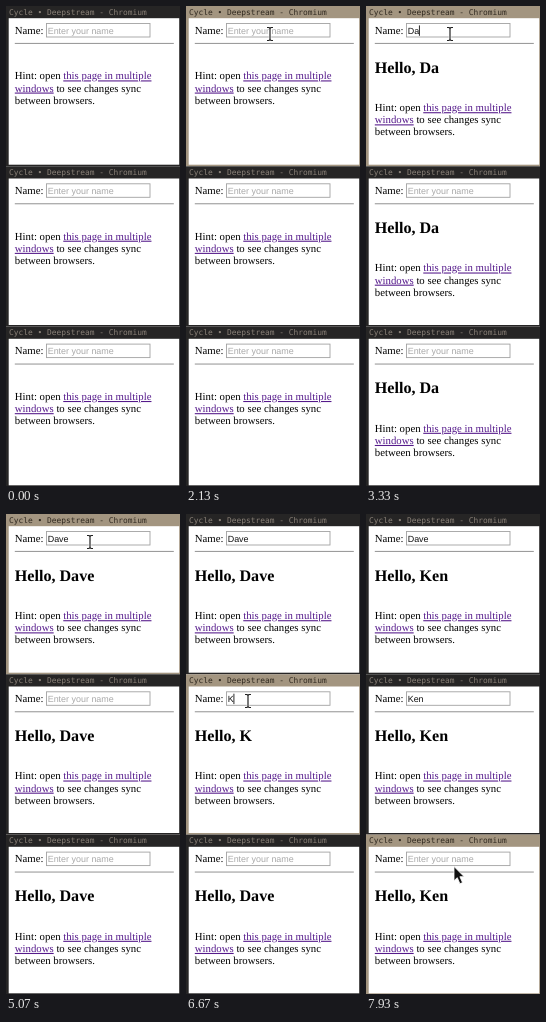
Write an HTML page that moves like this. It is 174 px wide and 480 px high and loops after 8000 ms.

```html
<!DOCTYPE html>
<html lang="en">
<head>
<meta charset="utf-8">
<title>Name sync</title>
<style>
  html, body { margin: 0; width: 100%; height: 100%; overflow: hidden; background: #fff; }
  svg { display: block; width: 174px; height: 480px; }
  text { text-rendering: geometricPrecision; white-space: pre; }
  .bar { font: 7.9px "DejaVu Sans Mono", monospace; }
  .body { font: 10.77px "Liberation Serif", serif; }
  .head { font: bold 16.1px "Liberation Serif", serif; }
  .field { font: 8.95px "Liberation Sans", sans-serif; }
  .link { fill: #551a8b; text-decoration: underline; }
</style>
</head>
<body>
<svg id="stage" viewBox="0 0 174 480"></svg>
<script>
const LOOP = 8000, TICK = 200 / 3, LAG = 60, PITCH = 160.3;
const stage = document.getElementById('stage');

function add(parent, tag, attrs, text) {
  const el = document.createElementNS('http://www.w3.org/2000/svg', tag);
  for (const key in attrs) el.setAttribute(key, attrs[key]);
  if (text) el.textContent = text;
  parent.appendChild(el);
  return el;
}

function makeWindow(index) {
  const g = add(stage, 'g', { transform: `translate(0 ${index * PITCH})` });
  const frame = add(g, 'rect', { width: 174, height: PITCH });
  add(g, 'rect', { x: 2.7, y: 12.2, width: 170.5, height: 146.5, fill: '#fff' });
  const bar = add(g, 'text', { x: 3, y: 8.5, class: 'bar' }, 'Cycle • Deepstream - Chromium');
  add(g, 'text', { x: 8.8, y: 27.8, class: 'body' }, 'Name:');
  add(g, 'rect', { x: 40.5, y: 17.5, width: 103.5, height: 13.5, fill: '#fff', stroke: '#a3a3a3', 'stroke-width': 0.9 });
  const field = add(g, 'text', { x: 41.7, y: 27.5, class: 'field' });
  const caret = add(g, 'rect', { y: 19.4, width: 0.9, height: 10.4, fill: '#111' });
  add(g, 'rect', { x: 8.8, y: 36.9, width: 159, height: 1.1, fill: '#9c9c9c' });
  const head = add(g, 'text', { x: 8.8, y: 66.5, class: 'head' });
  const hint = add(g, 'g', { class: 'body' });
  const line = n => add(hint, 'text', { x: 8.8, y: 73.4 + n * 12.15 });
  const first = line(0), second = line(1), third = line(2);
  add(first, 'tspan', {}, 'Hint: open ');
  add(first, 'tspan', { class: 'link' }, 'this page in multiple');
  add(second, 'tspan', { class: 'link' }, 'windows');
  add(second, 'tspan', {}, ' to see changes sync');
  third.textContent = 'between browsers.';
  return { frame, bar, field, caret, head, hint };
}

const windows = [0, 1, 2].map(makeWindow);

const arrow = add(stage, 'path', {
  d: 'M0 0V14.2L3.3 11.2L5.9 17.2L8.5 16.1L5.9 10.2H10.2Z',
  fill: '#111', stroke: '#fff', 'stroke-width': 0.8
});
const beam = add(stage, 'g', { fill: 'none' });
for (const [stroke, width] of [['#fff', 2.6], ['#222', 1.2]]) {
  add(beam, 'path', { d: 'M-3 -6.5H-1L0 -5.6L1 -6.5H3M0 -5.6V5.6M-3 6.5H-1L0 5.6L1 6.5H3', stroke, 'stroke-width': width });
}

// Names as typed: owner window and the time of each key
const entries = [
  { owner: 0, name: 'Dave', keys: [2930, 3130, 3340, 3400] },
  { owner: 1, name: 'Ken', keys: [6670, 6870, 6930] }
];
const typed = (entry, t) => entry.name.slice(0, entry.keys.filter(k => t >= k).length);

function heading(index, t) {
  let name = '';
  for (const e of entries) name = typed(e, index === e.owner ? t : t - LAG) || name;
  return name;
}

// Each pair of times is one span with the caret on
const carets = [
  [1530, 2130, 2730, 3930, 4530, 5070, 5330, 5530],
  [5870, 6470, 6670, 7530],
  []
];
const lit = (times, t) => times.filter(x => t >= x).length % 2 === 1;

// Pointer stops: time, x, y
const path = [
  [930, 186, 78], [1530, 83, 28], [1800, 83, 28], [1870, 84, 28],
  [5070, 84, 28], [5400, 53, 167], [5870, 62, 187],
  [7600, 62, 187], [7930, 88, 352.5]
];

function pointer(t) {
  const i = path.findIndex(p => p[0] > t);
  if (i === 0) return path[0].slice(1);
  if (i < 0) return path[path.length - 1].slice(1);
  const [t0, x0, y0] = path[i - 1], [t1, x1, y1] = path[i];
  const u = (t - t0) / (t1 - t0), k = u * (2 - u);
  return [x0 + (x1 - x0) * k, y0 + (y1 - y0) * k];
}

const show = (el, on) => el.setAttribute('visibility', on ? 'visible' : 'hidden');

function render(time) {
  const t = Math.round(Math.floor((time + 4) / TICK) * TICK / 10) * 10;
  const [x, y] = pointer(t);
  const active = t < 1000 ? -1 : Math.min(2, Math.floor(y / PITCH));

  windows.forEach((w, i) => {
    const on = i === active;
    w.frame.setAttribute('fill', on ? '#a39580' : '#262525');
    w.bar.setAttribute('fill', on ? '#30291f' : '#8a8178');

    const own = entries.find(e => e.owner === i);
    const value = own ? typed(own, t) : '';
    w.field.textContent = value;
    w.caret.setAttribute('x', 41.5 + (value ? w.field.getComputedTextLength() : 0));
    w.field.textContent = value || 'Enter your name';
    w.field.setAttribute('fill', value ? '#111' : '#a9a9a9');
    show(w.caret, lit(carets[i], t));

    const name = heading(i, t);
    w.head.textContent = name && 'Hello, ' + name;
    w.hint.setAttribute('transform', `translate(0 ${name ? 31.8 : 0})`);
  });

  const local = y - Math.max(0, active) * PITCH;
  const inField = x > 40 && x < 144 && local > 17 && local < 31;
  const place = `translate(${x} ${y})`;
  arrow.setAttribute('transform', place);
  beam.setAttribute('transform', place);
  show(arrow, active >= 0 && !inField);
  show(beam, active >= 0 && inField);
}

const start = performance.now();
function loop() {
  render((performance.now() - start) % LOOP);
  requestAnimationFrame(loop);
}
loop();
</script>
</body>
</html>
```
